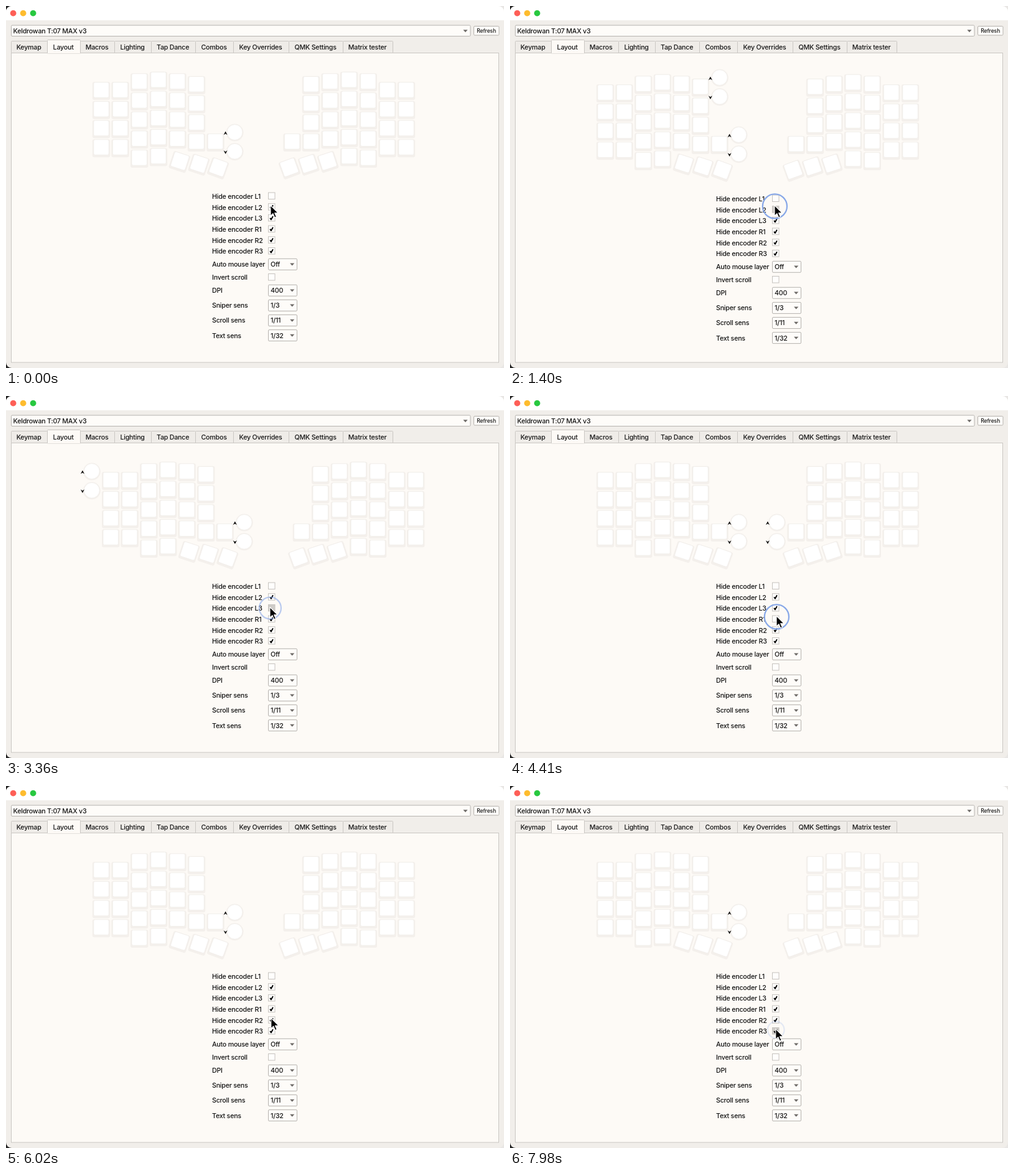
These frames come from a looping animation (800 by 582 pixels, 8 s). An HTML page:

```html
<!DOCTYPE html>
<html lang="en">
<head>
<meta charset="utf-8">
<title>Keyboard layout settings</title>
<style>
  html, body { margin: 0; width: 100%; height: 100%; overflow: hidden; background: #262626; }
  svg { display: block; width: 800px; height: 582px; }
  text { font: 500 10.7px Inter, "Open Sans", sans-serif; letter-spacing: -.24px; fill: #141414; }
  .mid { text-anchor: middle; }
  .small { font-size: 8.6px; letter-spacing: -.1px; }
  .box { fill: #fffefc; stroke: #c6c3bf; }
  .field { fill: #fefcf9; stroke: #b6b3af; }
  .tab { fill: #efece8; stroke: #cac7c3; }
  .tab.on { fill: #fdfaf6; }
  .edge { fill: #f4f0ec; }
  .face { fill: #fff; stroke: #f0ece8; stroke-width: .7; }
  .tick { fill: none; stroke: #000; stroke-width: 1.9; stroke-linejoin: round; }
</style>
</head>
<body>
<svg id="stage" viewBox="0 0 800 582"></svg>
<script>
const LOOP = 8000;
const stage = document.getElementById('stage');

const rect = (x, y, w, h, cls, r = 0) =>
  `<rect x="${x}" y="${y}" width="${w}" height="${h}" rx="${r}" class="${cls}"/>`;
const label = (x, y, s, cls = '') => `<text x="${x}" y="${y + 3.9}" class="${cls}">${s}</text>`;
const drop = (x, y) => `<path d="M${x - 3.6} ${y - 1.8}h7.2l-3.6 4z" fill="#6d6a67"/>`;

// Keyboard
const key = (x, y, turn = 0) => `<g transform="translate(${x} ${y}) rotate(${turn})">
  ${rect(-14.2, -13.2, 28.4, 29, 'edge', 3)}${rect(-12.2, -12.6, 24.4, 24.6, 'face', 2.5)}</g>`;
const PITCH = 30.7;
const columns = [[153, 135.3, 4], [183.5, 135.3, 4], [214.2, 121.4, 5], [244.9, 118.9, 5],
  [275.4, 121.4, 4], [306, 126, 4], [336.4, 218.1, 1]];
const thumbs = [[279.3, 249.5, 18], [310.2, 254, 18], [341, 259.7, 20]];

function keyboard() {
  let out = '';
  for (const [x, y, n] of columns)
    for (let i = 0; i < n; i++)
      out += key(x, y + i * PITCH) + key(796 - x, y + i * PITCH);
  for (const [x, y, turn] of thumbs) out += key(x, y, turn) + key(796 - x, y, -turn);
  return out;
}

function encoder(id, x, y) {
  const part = (dy, flip) => `<g transform="translate(${x} ${y + dy})">
    <circle r="14" cy=".6" class="edge"/><circle r="12.4" class="face"/>
    <path d="M-17.9 4.2l3-5.8 3 5.8-3-2z" transform="${flip}"/></g>`;
  return `<g id="${id}">${part(0, '')}${part(PITCH, 'matrix(1 0 0 -1 0 2.8)')}</g>`;
}

// Settings form
const options = ['L1', 'L2', 'L3', 'R1', 'R2', 'R3'];
const selects = [['Auto mouse layer', 415.3, 'Off'], ['DPI', 457.3, '400'],
  ['Sniper sens', 481.4, '1/3'], ['Scroll sens', 505.5, '1/11'], ['Text sens', 529.6, '1/32']];

const checkbox = (id, y) => rect(421.5, y - 5.5, 10.5, 10.5, 'box').replace('<rect', `<rect id="b${id}"`) +
  `<path id="t${id}" class="tick" d="M424.2 ${y}l1.7 2.5 3-5.4"/>`;

const form = options.map((o, i) => label(331, 306 + i * 17.7, 'Hide encoder ' + o) +
    checkbox(o, 305.5 + i * 17.7)).join('') +
  label(331, 436, 'Invert scroll') + checkbox('Inv', 436) +
  selects.map(([name, y, v]) => label(331, y, name) +
    rect(421.5, y - 9, 46, 18, 'field', 1.5) + label(425, y, v) + drop(459.7, y)).join('');

// Window frame
const tabs = [['Keymap', 8, 66], ['Layout', 66, 119], ['Macros', 119, 174], ['Lighting', 174, 233],
  ['Tap Dance', 233, 304], ['Combos', 304, 365], ['Key Overrides', 365, 454],
  ['QMK Settings', 454, 541], ['Matrix tester', 541, 621]];
const tab = ([name, a, b], on) =>
  rect(a + .5, on ? 54.5 : 56.5, b - a, on ? 22 : 19, on ? 'tab on' : 'tab', 1) +
  label((a + b) / 2 - .4, on ? 65.6 : 66.2, name, 'mid');

stage.innerHTML = `
  <rect x="400" width="400" height="582" fill="#e8e6e4"/>
  <rect width="800" height="582" rx="9" fill="#f1eeea"/>
  <path d="M0 23V9a9 9 0 0 1 9-9h782a9 9 0 0 1 9 9v14z" fill="#fff"/>
  ${['#fe5f57', '#febc2e', '#28c840'].map((c, i) =>
    `<circle cx="${11.6 + i * 16}" cy="11.6" r="4.9" fill="${c}"/>`).join('')}
  ${rect(8.5, 31, 737.5, 17.5, 'field', 1.5)}${label(11.5, 40, 'Keldrowan T:07 MAX v3')}${drop(738, 40)}
  ${rect(751.5, 32.5, 40.5, 14.5, 'field', 1.5)}${label(771.7, 39.2, 'Refresh', 'mid small')}
  ${tabs.map(t => tab(t, false)).join('')}
  ${rect(8.5, 75.5, 783, 497.5, 'tab on')}
  ${tab(tabs[1], true)}
  <path d="M67 75.5h52" stroke="#fdfaf6" stroke-width="2"/>
  <g id="body">
    <g id="keys">${keyboard()}
      ${encoder('L1', 367.5, 203)}${encoder('L2', 336.8, 111)}${encoder('L3', 122.6, 121)}
      ${encoder('R1', 428.8, 203)}${encoder('R2', 459.5, 111)}</g>
    ${form}
  </g>
  <circle id="ring" fill="none" stroke="#88a8e8" stroke-width="2.2"/>
  <path id="cursor" d="M0 0V16.8L3.9 13.2 6.7 19.6 9.4 18.4 6.6 12.2H12z"
    fill="#000" stroke="#fff" stroke-width="1.1" stroke-linejoin="round"/>`;

// Each press: start, release, option it toggles
const presses = [[70, 350, 'L2'], [1190, 1470, 'L2'], [2520, 2800, 'L3'], [3290, 3500, 'L3'],
  [4130, 4340, 'R1'], [4900, 5110, 'R1'], [6090, 6300, 'R2'], [7000, 7210, 'R2'], [7960, 8200, 'R3']];
// Cursor moves: start, end, target
const moves = [[0, 0, 425, 320.5], [1890, 2170, 424, 339.5], [3800, 4060, 428, 353.5],
  [5600, 5900, 425.8, 373], [7600, 7840, 426.8, 390.5]];

const $ = id => document.getElementById(id);
const clamp = v => Math.max(0, Math.min(1, v));
const ease = v => v * v * (3 - 2 * v);

function cursorAt(t) {
  let [, , x, y] = moves[0];
  for (const [a, b, tx, ty] of moves.slice(1)) {
    const p = ease(clamp((t - a) / (b - a)));
    x += (tx - x) * p;
    y += (ty - y) * p;
  }
  return [x, y];
}

function draw(t) {
  const shown = { L1: true };
  let held = '', radius = 0, alpha = 0;
  for (const [down, up, id] of presses) {
    if (t >= up) shown[id] = !shown[id];
    else if (t >= down) held = id;
    if (t >= down && t < up + 330) {
      const grow = clamp((t - down) / 140), fade = clamp((t - up - 90) / 240);
      radius = 11 + 8.6 * (1 - (1 - grow) ** 2) - 3 * fade;
      alpha = Math.sqrt(grow) * grow ** .3 * (1 - fade);
    }
  }
  for (const o of options) {
    $('t' + o).style.display = shown[o] ? 'none' : '';
    $('b' + o).style.fill = held === o ? '#cfccc8' : '';
    if ($(o)) $(o).style.display = shown[o] ? '' : 'none';
  }
  $('tInv').style.display = 'none';
  $('body').setAttribute('transform', `translate(0 ${shown.L2 || shown.R2 ? 4 : 0})`);
  $('keys').setAttribute('transform', `translate(${shown.L3 ? 15.2 : 0} 0)`);

  const [x, y] = cursorAt(t);
  $('cursor').setAttribute('transform', `translate(${x} ${y})`);
  const ring = $('ring');
  ring.setAttribute('cx', x + .4);
  ring.setAttribute('cy', y + 1.5);
  ring.setAttribute('r', radius);
  ring.setAttribute('opacity', alpha);
}

const start = performance.now();
function tick() {
  draw((performance.now() - start) % LOOP);
  requestAnimationFrame(tick);
}
tick();
</script>
</body>
</html>
```
